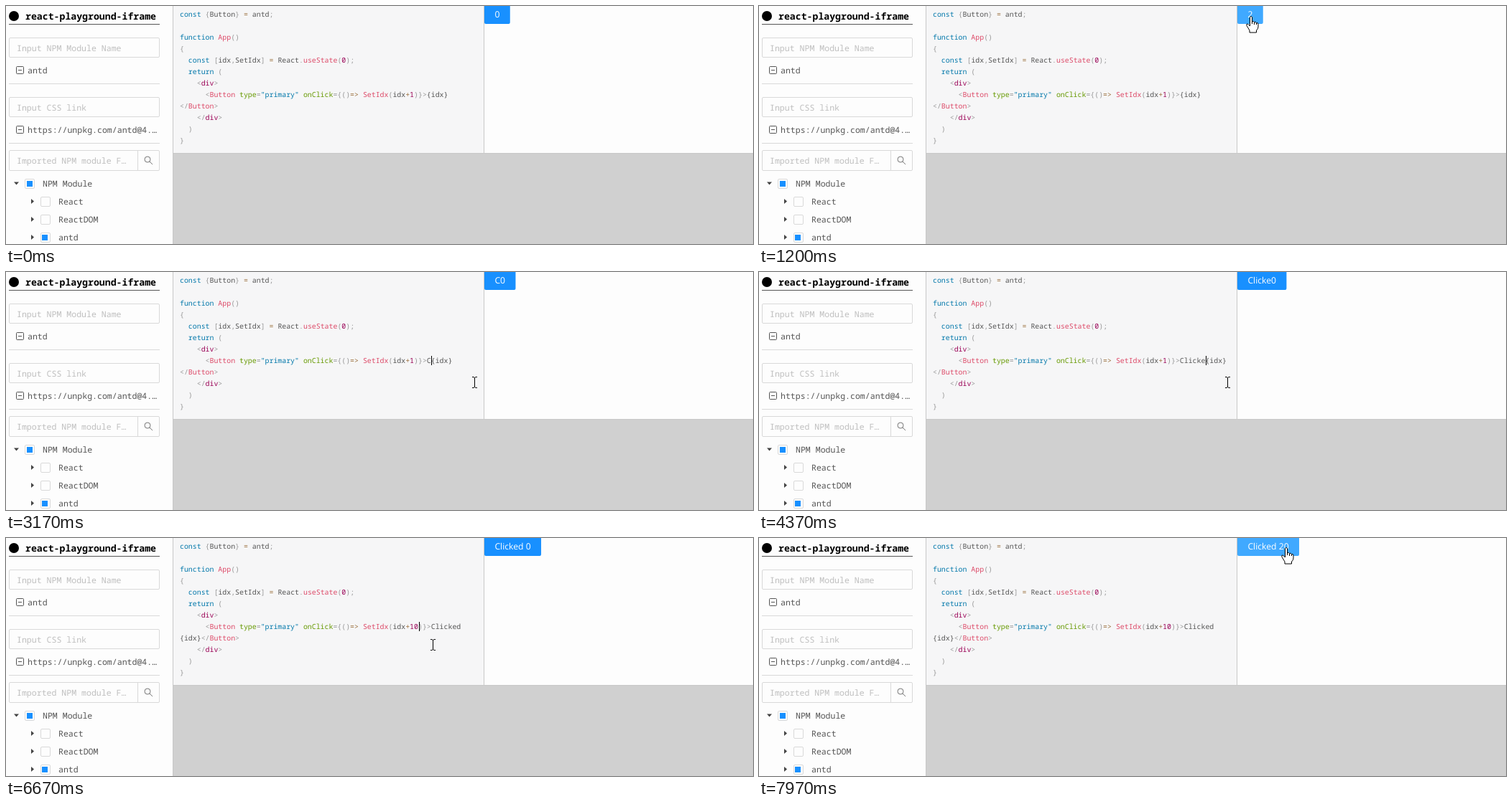
Write an HTML page that moves like this. It is 1040x332 px and loops after 8 s.

```html
<!DOCTYPE html>
<html lang="en">
<head>
<meta charset="utf-8">
<title>Playground</title>
<style>
  html, body { margin: 0; width: 100%; height: 100%; overflow: hidden; background: #fdfdfd; }
  svg { display: block; }
  text { font: 11.55px "Noto Sans Mono", monospace; fill: #555; white-space: pre; text-rendering: geometricPrecision; }
  .title { font-size: 13.2px; font-weight: 700; fill: #000; }
  .hint { fill: #bfbfbf; }
  .box { fill: none; stroke: #d9d9d9; }
  .icon { fill: none; stroke: #555; }
  .code text { font-size: 9.9px; }
  .code .k { fill: #07a; }
  .code .f { fill: #dd4a68; }
  .code .p { fill: #999; }
  .code .a { fill: #690; }
  .code .n { fill: #905; }
  .code .o { fill: #9a6e3a; }
  #label { font: 12.2px "Open Sans", sans-serif; fill: #fff; }
</style>
</head>
<body>
<svg width="1040" height="332" viewBox="0 0 1040 332">
  <defs>
    <g id="minus" class="icon"><rect x=".5" y=".5" width="10" height="10" rx="1"/><path d="M3 5.5h5"/></g>
    <rect id="check" class="box" x=".5" y=".5" width="13" height="13" rx="1.5"/>
    <path id="closed" d="M0 0l4 3.5-4 3.5z" fill="#444"/>
  </defs>

  <circle cx="11" cy="14" r="7" fill="#000"/>
  <text class="title" x="27" y="19">react-playground-iframe</text>
  <path d="M4 25.5H214" stroke="#555"/>
  <path d="M4 108.5H214M4 191.5H214" stroke="#d9d9d9"/>

  <rect class="box" x="4.5" y="44.5" width="209" height="27" rx="1.5"/>
  <text class="hint" x="15" y="63">Input NPM Module Name</text>
  <use href="#minus" x="14" y="84"/>
  <text x="30" y="94">antd</text>

  <rect class="box" x="4.5" y="127.5" width="209" height="27" rx="1.5"/>
  <text class="hint" x="15" y="146">Input CSS link</text>
  <use href="#minus" x="14" y="167"/>
  <text x="30" y="177">https://unpkg.com/antd@4.…</text>

  <rect class="box" x="4.5" y="201.5" width="209" height="28" rx="1.5"/>
  <path class="box" d="M183.5 202V229"/>
  <text class="hint" x="15" y="220">Imported NPM module F…</text>
  <path class="icon" d="M201 214a4 4 0 1 0-8 0a4 4 0 1 0 8 0M200 217l4 4" stroke-opacity=".8"/>

  <path d="M11 245.5h7l-3.500 4z" fill="#444"/>
  <use href="#check" x="26" y="241"/>
  <text x="51" y="252">NPM Module</text>
  <use href="#closed" x="35" y="269"/><use href="#check" x="48" y="266"/>
  <text x="73" y="277">React</text>
  <use href="#closed" x="35" y="294"/><use href="#check" x="48" y="291"/>
  <text x="73" y="302">ReactDOM</text>
  <use href="#closed" x="35" y="319"/><use href="#check" x="48" y="316"/>
  <text x="73" y="327">antd</text>
  <path d="M29 244h8v8h-8zM50 319h8v8h-8z" fill="#1890ff"/>

  <rect x="232" width="434" height="205" fill="#f6f6f7"/>
  <rect x="232" y="205" width="808" height="127" fill="#d0d0d0"/>
  <path d="M232.5 0V332M665.5 0V205M232 205.500H1040" stroke="#c8c8c8" fill="none"/>

  <g class="code">
    <text x="242" y="15"><tspan class="k">const</tspan> <tspan class="p">{</tspan>Button<tspan class="p">}</tspan> <tspan class="o">=</tspan> antd<tspan class="p">;</tspan></text>
    <text x="242" y="47"><tspan class="k">function</tspan> <tspan class="f">App</tspan><tspan class="p">()</tspan></text>
    <text x="242" y="63" class="p">{</text>
    <text x="242" y="79">  <tspan class="k">const</tspan> <tspan class="p">[</tspan>idx<tspan class="p">,</tspan>SetIdx<tspan class="p">]</tspan> <tspan class="o">=</tspan> React<tspan class="p">.</tspan><tspan class="f">useState</tspan><tspan class="p">(</tspan><tspan class="n">0</tspan><tspan class="p">);</tspan></text>
    <text x="242" y="95">  <tspan class="k">return</tspan> <tspan class="p">(</tspan></text>
    <text x="242" y="111">    <tspan class="p">&lt;</tspan><tspan class="n">div</tspan><tspan class="p">&gt;</tspan></text>
    <text x="242" y="127">      <tspan class="p">&lt;</tspan><tspan class="f">Button</tspan> <tspan class="a">type</tspan><tspan class="p">=</tspan><tspan class="k">"primary"</tspan> <tspan class="a">onClick</tspan><tspan class="p">={()</tspan><tspan class="o">=&gt;</tspan> <tspan class="f">SetIdx</tspan><tspan class="p">(</tspan>idx<tspan class="o">+</tspan><tspan class="n" id="step"></tspan><tspan class="p">)}&gt;</tspan><tspan id="typed"></tspan><tspan id="inline"></tspan></text>
    <text x="242" y="143"><tspan id="wrapped"></tspan><tspan class="p">&lt;/</tspan><tspan class="f">Button</tspan><tspan class="p">&gt;</tspan></text>
    <text x="242" y="159">    <tspan class="p">&lt;/</tspan><tspan class="n">div</tspan><tspan class="p">&gt;</tspan></text>
    <text x="242" y="175" class="p">  )</text>
    <text x="242" y="191" class="p">}</text>
  </g>
  <rect id="caret" width="1" height="13" fill="#000"/>

  <rect id="button" x="666" y="-3" height="28" rx="2"/>
  <text id="label" x="680.4" y="16"></text>

  <path id="beam" d="M-3-7.500h2l1.500 1 1.500-1h2M.5-6.500v13M-3 7.500h2l1.500-1 1.500 1h2" fill="none" stroke="#000"/>
  <path id="arrow" d="M0 0v16l4-3.500 2.500 6 2.500-1-2.500-6h5.500z" fill="#fff" stroke="#000"/>
  <path id="hand" d="M-3.500 1.500Q-2-.8-.5 1.500V8Q1.500 6.500 2.500 8.500 4.500 7.500 5.500 9.500 8 9 8 11.500V15Q8 18 5.500 20V23H-4V20L-8 13.500Q-9 10.500-6.500 11L-3.500 14Z M-.5 8v3M2.500 9v3M5.500 10v2" fill="#fff" stroke="#000"/>
</svg>
<script>
const $ = id => document.getElementById(id);
const CH = 5.94, LEFT = 242;

// [time, x, y]
const path = [
  [170, 600, 340], [970, 687, 14], [1830, 687, 14], [2100, 571, 126], [2220, 583, 126],
  [2500, 586, 126], [2640, 586, 126], [2800, 652, 154], [4770, 652, 154], [5070, 451, 160],
  [5530, 570, 126], [5640, 570, 126], [5870, 594, 149], [6670, 594, 149],
  [7200, 772, 80], [7470, 745, 16], [7600, 736, 13]
];
const keys = [3030, 3330, 3530, 4000, 4230, 4370, 4530, 4770];
const clicks = [1000, 1170, 1600];
const lateClicks = [7530, 7800];

// [time, column, row]; a negative column means no focus
const carets = [
  [0, -1, 7], [2100, 55, 7], [2400, 58, 7],
  ...keys.map((t, i) => i < 7 ? [t, 59 + i, 7] : [t, 0, 8]),
  [5570, 55, 7], [6300, 55, 7], [6670, 56, 7], [7530, -1, 7]
];

const passed = (times, t) => times.filter(x => x <= t).length;

function pointer(t) {
  if (t < path[0][0]) return null;
  const i = path.findIndex(p => p[0] > t);
  if (i < 0) return path.at(-1).slice(1);
  const [t0, x0, y0] = path[i - 1], [t1, x1, y1] = path[i];
  const s = (t - t0) / (t1 - t0), e = s * s * (3 - 2 * s);
  return [x0 + (x1 - x0) * e, y0 + (y1 - y0) * e];
}

function draw(t) {
  const typed = "Clicked ".slice(0, passed(keys, t));
  const wraps = typed.length > 6;
  $("step").textContent = t < 6670 ? "1" : "10";
  $("typed").textContent = typed;
  $("inline").textContent = wraps ? "" : "{idx}";
  $("wrapped").textContent = wraps ? "{idx}" : "";

  const [since, col, row] = carets.findLast(c => c[0] <= t);
  const lit = col >= 0 && (t - since) % 1060 < 530;
  $("caret").setAttribute("visibility", lit ? "visible" : "hidden");
  $("caret").setAttribute("x", Math.round(LEFT + col * CH));
  $("caret").setAttribute("y", 5 + row * 16);

  const count = typed ? passed(lateClicks, t) * 10 : passed(clicks, t);
  const text = typed + count;
  if ($("label").textContent !== text) $("label").textContent = text;
  const width = 28.8 + $("label").getComputedTextLength();
  $("button").setAttribute("width", width);

  const at = pointer(t);
  let shape = "";
  if (at) {
    const [x, y] = at;
    shape = x >= 666 && x < 666 + width && y < 25 ? "hand" : x > 232 && x < 666 && y < 205 ? "beam" : "arrow";
    $(shape).setAttribute("transform", `translate(${Math.round(x)} ${Math.round(y)})`);
  }
  for (const id of ["hand", "beam", "arrow"])
    $(id).setAttribute("visibility", id === shape ? "visible" : "hidden");
  $("button").setAttribute("fill", shape === "hand" ? "#40a9ff" : "#1890ff");
}

const start = performance.now();
function tick(now) {
  draw(Math.max(0, now - start) % 8000);
  requestAnimationFrame(tick);
}
draw(0);
requestAnimationFrame(tick);
</script>
</body>
</html>
```
